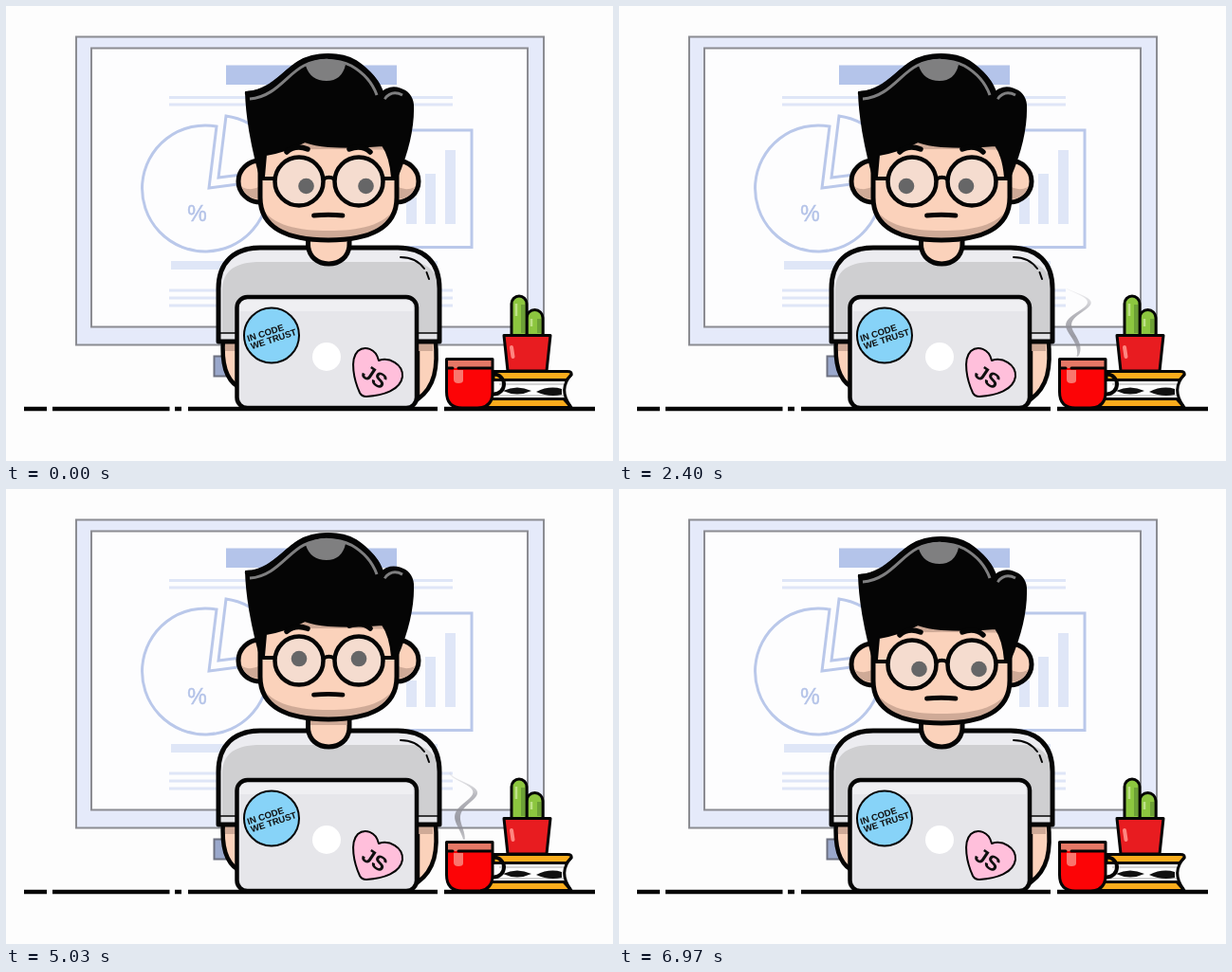
These frames come from a looping animation (640 by 480 pixels, 7010 ms). An HTML page:

```html
<!DOCTYPE html>
<html lang="en">
<head>
<meta charset="utf-8">
<title>Coder at a desk</title>
<style>
html, body { margin: 0; width: 100%; height: 100%; overflow: hidden; background: #fdfdfd; }
svg { display: block; width: 640px; height: 480px; }
text { font-family: "Liberation Sans", Arial, sans-serif; font-weight: bold; text-anchor: middle; }
.line { fill: none; stroke: #050505; stroke-linecap: round; stroke-linejoin: round; }
.ink { stroke: #050505; stroke-width: 5; stroke-linejoin: round; stroke-linecap: round; }
.mid { stroke-width: 4.5; }
.thin { stroke-width: 3; }
.fine { stroke-width: 2; }
.skin { fill: #fbd2bb; }
.shade { fill: #cfaa97; }
.red { fill: #fc0406; }
.gold { fill: #fbac1c; }
</style>
</head>
<body>
<svg viewBox="0 0 640 480">
  <defs>
    <linearGradient id="smoke" gradientUnits="userSpaceOnUse" x1="0" y1="370" x2="0" y2="298">
      <stop offset="0" stop-color="#8c8c94" stop-opacity=".5"/>
      <stop offset=".3" stop-color="#8c8c94" stop-opacity=".85"/>
      <stop offset=".65" stop-color="#9a9aa2" stop-opacity=".7"/>
      <stop offset="1" stop-color="#c0c0c6" stop-opacity=".15"/>
    </linearGradient>
    <clipPath id="faceClip"><path d="M268 140V202C268 235 298 247 340 247S412 235 412 202V140Z"/></clipPath>
    <clipPath id="hairClip"><path d="M253 92C279 91 291 71 309 60C328 49 352 50 367 59C384 70 393 80 397 94C405 83 427 86 429 105V150H258Z"/></clipPath>
  </defs>

  <g id="board">
    <rect x="219.5" y="369.500" width="180" height="21" fill="#9aa8cc" stroke="#6c7080" stroke-width="2"/>
    <rect x="74" y="32.500" width="493" height="325" fill="#e5eafa" stroke="#8b8c92" stroke-width="2"/>
    <rect x="90" y="44.500" width="460" height="294" fill="#fdfdfe" stroke="#8b8c92" stroke-width="2"/>
    <rect x="232" y="62.500" width="180" height="20.500" fill="#b4c4ea"/>
    <path d="M172 96.500H471M172 104H471M172 300H471M172 308H471M172 316H471" stroke="#dfe6f7" stroke-width="3"/>
    <path d="M174 273.500H455" stroke="#dfe6f7" stroke-width="9"/>
    <g fill="none" stroke="#bac8ea" stroke-width="3">
      <path d="M222 127A66.500 66.500 0 1 0 276 184L214 192Z"/>
      <path d="M232 116L224 181L289 173A66.500 66.500 0 0 0 232 116Z"/>
      <rect x="360" y="131" width="131" height="123.500"/>
    </g>
    <path d="M427.500 230V202M447.500 230V177M468.500 230V152" stroke="#dfe6f7" stroke-width="11"/>
    <text x="201.500" y="227" font-size="23" style="font-weight:normal" fill="#b4c3e8" stroke="#b4c3e8" stroke-width=".5">%</text>
  </g>

  <path d="M19 425H43M49 425H172.500M178 425H185M192 425H455M462 425H621" stroke="#050505" stroke-width="4.500"/>

  <path id="steam" fill="url(#smoke)"/>

  <g id="cactus">
    <path class="ink thin" fill="#8cc63f" d="M549 350V329A8 8 0 0 1 566 329V350Z"/>
    <path class="ink thin" fill="#8cc63f" d="M533 350V314A8 8 0 0 1 549 314V350Z"/>
    <path d="M545 315V345M562 330V345" stroke="#6ca036" stroke-width="4"/>
    <path d="M538 314V327M554 330V338" stroke="#bfe388" stroke-width="2.500"/>
    <path class="ink thin" fill="#e81c20" d="M525 347.500H574L570 385H529Z"/>
    <path d="M533 360L534.500 370" stroke="#ff8680" stroke-width="4" stroke-linecap="round"/>
  </g>

  <g id="books">
    <path d="M516 394H590L587 404L591 414H512Z" fill="#fdfdfd"/>
    <path d="M520 399H588M518 411H588" stroke="#c8c8c8" stroke-width="1.500"/>
    <path d="M524 406Q539 399 554 406Q539 413 524 406ZM559 407Q573 400 586 404V410Q572 413 559 407Z" fill="#101010"/>
    <path class="ink thin gold" d="M514 385.500H592Q597 385.500 596 389L591 394.500H514Z"/>
    <path class="ink thin gold" d="M506 423.500L512 414.500H588L596 423.500Z"/>
    <path class="line" stroke-width="3" d="M596 389Q582 404 595 422"/>
  </g>

  <g id="cup">
    <circle class="line" cx="514.500" cy="399" r="10.500" stroke-width="4"/>
    <path class="red" d="M464.500 372.500H513V407Q513 424 497 424H481Q464.500 424 464.500 407Z"/>
    <path d="M465 372.500H513V382H465Z" fill="#e57866"/>
    <path d="M472 384H482V395Q482 398 477 398Q472 398 472 394Z" fill="#f9766e"/>
    <path class="line" stroke-width="3" d="M464.500 372.500H513V407Q513 424 497 424H481Q464.500 424 464.500 407ZM465 382H471M477 382H513"/>
  </g>

  <g id="body">
    <path class="ink mid skin" d="M229 350C227 378 232 394 245 402V350Z"/>
    <path class="ink mid skin" d="M452.500 350C456 382 452 402 434 415V350Z"/>
    <path class="shade" d="M231 353H244V364H231ZM433 353H450V364H433Z"/>
    <path d="M224 354V298C224 270 241 255 268 255H413C441 255 457 270 457 298V354Z" fill="#ececf0"/>
    <path d="M228 345V300C228 280 241 271 264 270H430Q447 272 454 286V345Z" fill="#cfcfd1"/>
    <path d="M226 345H455V353H226Z" fill="#e2e2e5"/>
    <path class="line" stroke-width="1.500" d="M226 345H455"/>
    <path class="line" stroke-width="5" d="M244 354H224V298C224 270 241 255 268 255H413C441 255 457 270 457 298V354H434"/>
    <path class="line" stroke-width="2" d="M416 265Q432 265 441 277M443.500 281L446 288"/>
    <path class="ink skin" d="M318.500 232V251C318.500 279 362 279 362 251V232Z"/>
    <path class="shade" d="M321 232H359.500V249H321Z"/>
  </g>

  <g id="head">
    <g id="ears">
      <ellipse class="ink skin" cx="268" cy="185" rx="23" ry="22"/>
      <ellipse class="ink skin" cx="412" cy="185" rx="23" ry="22"/>
      <path class="shade" d="M249 191Q259 196 268 190V204Q253 203 249 191ZM431 191Q421 196 412 190V204Q427 203 431 191Z"/>
    </g>
    <g clip-path="url(#faceClip)">
      <rect class="shade" x="260" y="130" width="160" height="120"/>
      <path class="skin" d="M262 152V196C270 230 302 237 340 237S410 230 418 196V152Q340 150 262 152Z"/>
    </g>
    <path class="line" stroke-width="5" d="M268 170V202C268 235 298 247 340 247S412 235 412 202V170"/>
    <path class="ink" style="stroke-width:2" fill="#050505" d="M253 91C280 91 290 70 308 59C326 48 354 49 369 58C384 68 391 78 397 91C405 82 427 86 429 104C430 132 421 160 412 181H407C406 168 404 157 397 147Q368 150 340 148Q326 147 315 143Q296 153 274 157L272 180H268C262 158 254 126 253 91Z"/>
    <g clip-path="url(#hairClip)" fill="none" stroke="#7f7f80">
      <path d="M257 98C284 96 296 72 314 63C330 55 350 56 364 63C378 71 386 80 391 94" stroke-width="3"/>
      <path d="M399 98Q407 88 418 94" stroke-width="3"/>
      <path d="M316 63Q321 79 338 79Q354 79 358 62Q337 49 316 63Z" fill="#7f7f80" stroke="none"/>
    </g>
    <path class="line" stroke-width="4.500" d="M254 92C279 91 292 70 310 60C328 50 352 51 366 59C384 70 393 80 397 95"/>
    <path id="browL" class="line" stroke-width="5.500" d="M296 154Q305 146 318 151"/>
    <path id="browR" class="line" stroke-width="5.500" d="M362 151Q375 146 384 154"/>
    <g class="line" stroke-width="4.500">
      <circle cx="309" cy="185" r="25.500" fill="#f5dccf"/>
      <circle cx="372" cy="185" r="25.500" fill="#f5dccf"/>
      <path stroke-width="4" d="M335 182.500Q340.500 179 346 182.500M271 182H283M398 182H411"/>
    </g>
    <g id="eyes" fill="#666667"><circle r="8.300"/><circle cx="63" r="8.300"/></g>
    <path class="line" stroke-width="4.800" d="M324.500 221Q340 219.500 355 221"/>
  </g>

  <g id="laptop">
    <rect class="ink mid" x="243.500" y="307" width="189.500" height="117" rx="11" fill="#e6e6ea"/>
    <path d="M247 322V318Q247 310 255 310H421Q429 310 429 318V322Z" fill="#efeff2"/>
    <circle cx="338" cy="370" r="15" fill="#fff"/>
    <circle class="ink fine" cx="280" cy="347.500" r="29" fill="#87d3f8"/>
    <g font-size="9.600" fill="#101010">
      <text transform="translate(274.500 348) rotate(-18)">IN CODE</text>
      <text transform="translate(283 354.500) rotate(-18)">WE TRUST</text>
    </g>
    <path class="ink fine" fill="#ffbfdb" d="M393 374C390 361 378 358 371 364C362 373 367 395 373 408Q375 412 380 412C398 411 416 405 418 391C419 378 404 370 393 374Z"/>
    <text transform="translate(384.500 397.500) rotate(34)" font-size="22" fill="#101010">JS</text>
  </g>
</svg>
<script>
const LOOP = 7010;
const TAU = Math.PI * 2;
const el = id => document.getElementById(id);

// Each row: time in ms, value
const tracks = {
  eyeX: [[0, 316.5], [2200, 303], [2600, 303], [4400, 309], [6000, 309], [6970, 316.5]],
  eyeY: [[0, 190], [3500, 190], [4450, 183], [6000, 183], [6970, 190]],
  head: [[0, 0], [4650, 0], [5450, -8.5], [6200, -8.5], [6970, 0]],
  browL: [[0, 0], [4650, 0], [5450, 0.5], [6200, 0.5], [6970, 0]],
  browR: [[0, 0], [4650, 0], [5450, -6.5], [6200, -6.5], [6970, 0]],
  grow: [[0, 0], [300, 0], [1500, 1]],
  fade: [[0, 0], [300, 0], [1000, 1], [5700, 1], [6550, 0]]
};

function valueAt(track, t) {
  const next = track.findIndex(row => row[0] > t);
  if (next < 0) return track[track.length - 1][1];
  const [t0, a] = track[next - 1], [t1, b] = track[next];
  const p = (t - t0) / (t1 - t0);
  return a + (b - a) * (1 - Math.cos(Math.PI * p)) / 2;
}

// A tapered ribbon along a rising wave, tighter and wider toward the top
function steamPath(t, grow) {
  const left = [], right = [];
  for (let d = 0; d <= 72; d += 2) {
    const rise = d / 72;
    const turns = d * (0.0085 + 0.00013 * d) - (t - 2400) / 3170 - 0.4;
    const x = 483 - 15 * Math.pow(rise, 0.65) * Math.cos(TAU * turns);
    const half = 0.7 + 2.3 * Math.sin(Math.PI * Math.pow(rise, 0.8));
    const y = (370 - d * grow).toFixed(2);
    left.push(`${(x - half).toFixed(2)} ${y}`);
    right.unshift(`${(x + half).toFixed(2)} ${y}`);
  }
  return "M" + left.concat(right).join("L") + "Z";
}

const move = (id, x, y) => el(id).setAttribute("transform", `translate(${x} ${y})`);

function draw() {
  const t = performance.now() % LOOP;
  const v = name => valueAt(tracks[name], t);
  move("head", 0, v("head"));
  move("eyes", v("eyeX"), v("eyeY"));
  move("browL", 0, v("browL"));
  move("browR", 0, v("browR"));
  el("steam").setAttribute("d", steamPath(t, v("grow")));
  el("steam").setAttribute("opacity", v("fade"));
  requestAnimationFrame(draw);
}
draw();
</script>
</body>
</html>
```
